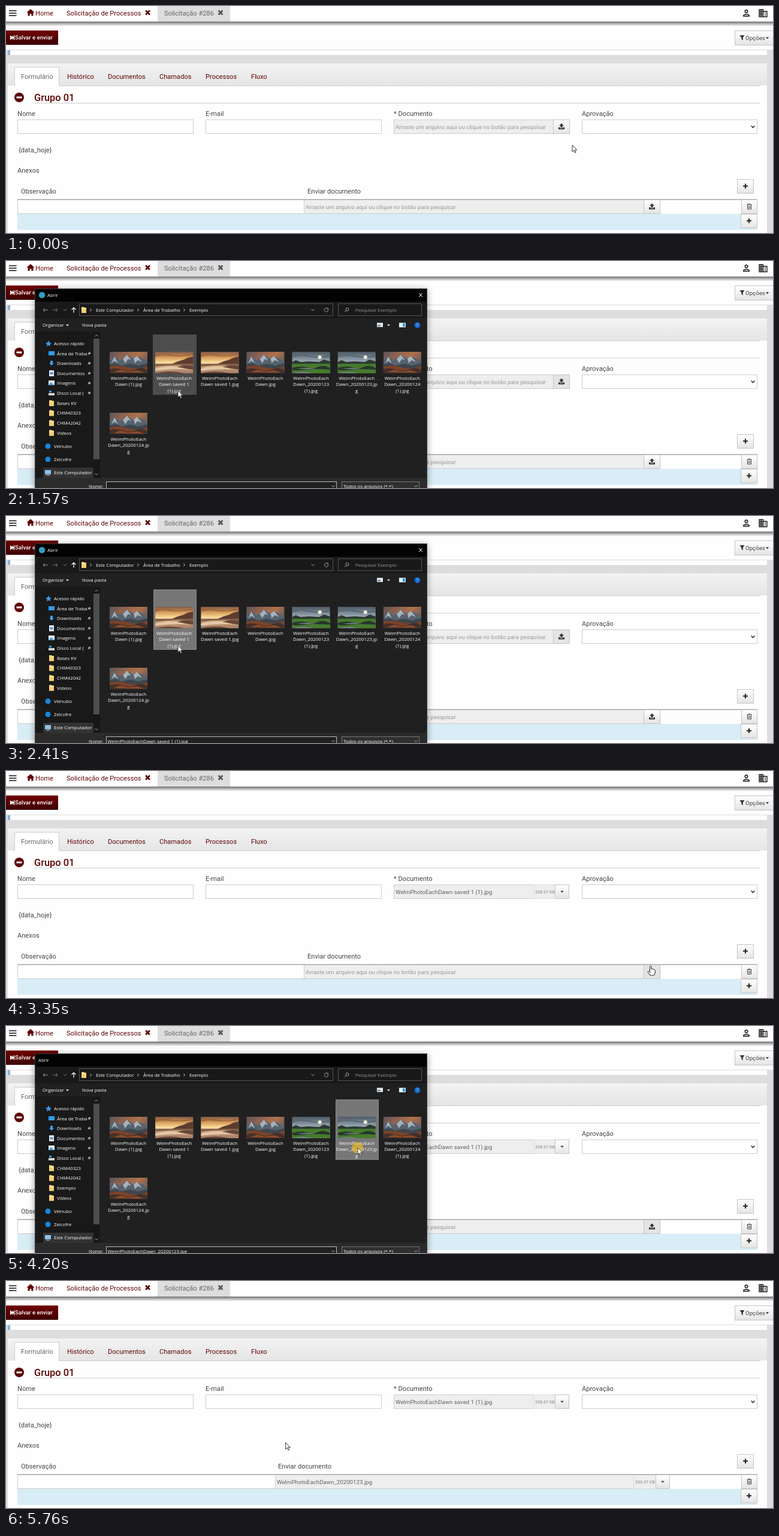
An HTML page for the animation above (6220 ms loop, 1280 by 380 pixels).

```html
<!DOCTYPE html>
<html lang="pt">
<head>
<meta charset="utf-8">
<title>Anexar documento</title>
<style>
html, body { margin: 0; width: 100%; height: 100%; overflow: hidden; background: #fefefe; }
svg { display: block; }
text { font: 11.1px Roboto, sans-serif; white-space: pre; }
.small { font-size: 9.7px; }
.tiny { font-size: 7.2px; }
.title { font-size: 16.4px; font-weight: 500; }
.bold { font-size: 9.6px; font-weight: 500; }
.dlg { font: 500 7.8px "Open Sans", sans-serif; }
.mid { text-anchor: middle; }
.glow { filter: drop-shadow(0 0 3px rgba(102, 175, 233, .8)); }
.shadow { filter: drop-shadow(0 2px 6px rgba(0, 0, 0, .4)); }
</style>
</head>
<body>
<svg id="stage" width="1280" height="380" viewBox="0 0 1280 380"></svg>
<script>
const LOOP = 6220;
const WINE = '#5f0505', INK = '#444', PALE = '#eee', EDGE = '#ccc', LIGHT = '#fff';
const PHOTO = 'WelmPhotoEachDawn';
const FIRST_FILE = PHOTO + ' saved 1 (1).jpg', SECOND_FILE = PHOTO + '_20200123.jpg';

// Drawing helpers, each returning SVG markup
const rect = (x, y, w, h, fill, extra = '') =>
  `<rect x="${x}" y="${y}" width="${w}" height="${h}" fill="${fill}" ${extra}/>`;
const box = (x, y, w, h, fill = '#fff', edge = EDGE, extra = '') =>
  rect(x + .5, y + .5, w - 1, h - 1, fill, `stroke="${edge}" ${extra}`);
const text = (x, y, s, fill = INK, cls = '') =>
  `<text x="${x}" y="${y}" fill="${fill}" class="${cls}">${s}</text>`;
const shape = (x, y, d, color) => `<path transform="translate(${x} ${y})" d="${d}" fill="${color}"/>`;
const line = (x, y, d, color, width = 1) =>
  `<path transform="translate(${x} ${y})" d="${d}" fill="none" stroke="${color}" stroke-width="${width}"/>`;
const dot = (x, y, r, color, extra = '') => `<circle cx="${x}" cy="${y}" r="${r}" fill="${color}" ${extra}/>`;
const gradient = (id, direction, ...colors) =>
  `<linearGradient id="${id}" ${direction}>${colors.map((c, i) =>
    `<stop offset="${i / (colors.length - 1)}" stop-color="${c}"/>`).join('')}</linearGradient>`;
const during = (from, to, ...parts) => `<g data-from="${from}" data-to="${to}">${parts.join('')}</g>`;

const cross = (x, y, color) => line(x, y, 'M-3.4-3.4L3.4 3.4M3.4-3.4L-3.4 3.4', color, 2.8);
const caret = (x, y, color = '#333', r = 2.7) => shape(x, y, `M${-r}-1.3H${r}L0 1.7Z`, color);
const chevron = (x, y, color, d = 'M-2.5-1.3L0 1.2L2.5-1.3') => line(x, y, d, color);
const next = (x, y) => chevron(x, y, '#ccc', 'M-1.2-2.3L1.1 0L-1.2 2.3');
const button = (x, y, w, h, face = 'url(#face)') => box(x, y, w, h, face, '#c4c4c4');
const plusButton = (x, y, w) =>
  button(x, y, w, 24) + line(x + w / 2, y + 11.5, 'M-4 0H4M0-4V4', '#222', 2);
const uploadButton = (x, y, face) => button(x, y, 28, 24, face)
  + shape(x + 14, y + 11.5, 'M0-5L4-1H1.5V2H-1.5V-1H-4ZM-5 1.5H-2.5V3H2.5V1.5H5V5H-5Z', '#333');
const folder = (x, y) => shape(x, y, 'M-4-5H0L1-4H4V5H-4Z', '#f5cf6d') + rect(x - 4, y - 2.5, 8, 1, '#fff0b8');

const arrow = (x, y, edge = '#222') =>
  `<path transform="translate(${x} ${y})" d="M0 0V11L2.6 8.6L4.4 12.6L6.2 11.9L4.4 8H7.8Z" fill="#fff" stroke="${edge}" stroke-width=".9"/>`;
const hand = (x, y) =>
  `<path transform="translate(${x} ${y})" d="M-2.5 4V-7Q-1.3-9 0-7V-2.5Q1.5-3.7 2.3-2Q3.6-3 4.3-1.5Q6-2 6.3 0V4L4.5 8H-2.5L-6 2.5Q-5.5 0-2.5 2" fill="#fff" stroke="#222"/>`;

const DOWN = 'x2="0" y2="1"';
const defs = `<defs>
  ${gradient('drop', DOWN, 'rgba(0,0,0,.55)', 'rgba(0,0,0,0)')}
  ${gradient('face', DOWN, '#fff', '#e4e4e4')}
  ${gradient('tabs', DOWN, '#f3f3f3', '#e5e5e5')}
  ${gradient('wine', DOWN, '#720000', '#3b0000')}
  ${gradient('dusk', 'x2="1" y2=".5"', '#5c5357', '#8f6350', '#b0714a', '#665a5e')}
  ${gradient('sunset', DOWN, '#7f5a48', '#d59a58', '#fbdc9c', '#c99a72', '#a07c68')}
  ${gradient('cloud', DOWN, '#4d5963', '#8593a0', '#c3cdd2', '#7d8a90')}
  <g id="peak">${rect(0, 0, 63, 36, 'url(#dusk)')}
    ${shape(0, 0, 'M0 13L8 8L17 14L29 5L38 11L46 7L63 16V28H0Z', '#56636f')}
    ${shape(0, 0, 'M29 5L36 14L31 12L26 19L22 12ZM46 7L54 17L47 14L42 19L40 11ZM8 8L14 19L8 15L3 19Z', '#a9b2ba')}
    ${shape(0, 0, 'M0 21L10 19L20 23L34 20L48 23L63 19V28H0Z', '#3e454c')}
    ${shape(0, 0, 'M0 25Q14 21 30 26T63 24V36H0Z', '#7d4329')}
    ${shape(0, 0, 'M0 29Q10 26 22 30T44 29T63 31V36H0Z', '#44302a')}
    ${shape(0, 0, 'M6 34L18 30L30 33L46 31L58 35Z', '#8d4d2c')}</g>
  <g id="beach">${rect(0, 0, 63, 36, 'url(#sunset)')}
    ${shape(0, 0, 'M0 3Q18 2 30 5T63 2V6Q40 9 24 7T0 9Z', '#a4683f')}
    ${shape(0, 0, 'M63 8Q54 9 48 13L38 16L28 20H63Z', '#5d3c30')}
    ${shape(0, 0, 'M0 20H63V24Q34 21 0 25Z', '#86614f')}
    ${shape(0, 0, 'M0 28Q24 22 44 27T63 27V30Q30 27 0 32Z', '#e2c7a9')}
    ${shape(0, 0, 'M36 25Q52 21 63 24V30Q50 28 36 25ZM0 36Q24 30 48 36Z', '#654638')}</g>
  <g id="field">${rect(0, 0, 63, 36, 'url(#cloud)')}
    ${shape(0, 0, 'M0 5Q15 1 30 6T63 4V9Q40 11 25 8T0 10Z', '#5b6973')}
    ${dot(46, 9, 3, '#fffbe0')}
    ${shape(0, 0, 'M0 17L6 14L14 17L28 16L45 17L53 13L63 16V23H0Z', '#2c3932')}
    ${rect(0, 20, 63, 16, '#477a2d')}
    ${shape(0, 0, 'M0 27Q12 23 24 26T44 25T63 27V30Q40 28 22 30T0 30Z', '#27362a')}
    ${shape(0, 0, 'M8 28Q24 26 40 28Q24 30 8 28ZM0 36Q18 31 34 36Z', '#718086')}</g>
</defs>`;

function topBar() {
  return rect(0, 26, 1280, 8, 'url(#drop)') + rect(0, 0, 1280, 26, '#fff') + rect(253, 0, 121, 26, '#ddd')
    + line(5, 0, 'M0 8H12.5M0 12H12.5M0 16H12.5', '#111', 1.7)
    + shape(41, 11, 'M0-6L6.5 0H4.5V5.5H1.3V2H-1.3V5.5H-4.5V0H-6.5Z', WINE)
    + text(49, 15.5, 'Home', WINE)
    + text(101, 15.5, 'Solicitação de Processos', WINE) + cross(236.5, 11, WINE)
    + text(264, 15.5, 'Solicitação #286', '#666') + cross(358, 11, '#555')
    + dot(1235.5, 9, 2.3, 'none', 'stroke="#111" stroke-width="1.4"')
    + line(1235.5, 17, 'M-4.7 0V-1.5Q0-5 4.7-1.5V0Z', '#111', 1.4)
    + line(1257, 6, 'M0 0H6.5V12H0ZM6.5 3H13V12H6.5M0 3H6.5M0 6H6.5M0 9H6.5M3.2 0V12M9 6H11M9 9H11', '#111', 1.3);
}

function actions() {
  return rect(0, 41, 87, 24, 'url(#wine)')
    + shape(7, 49, 'M0 0L3.5 3V0L6 3.5V0H7.2V8H6V4.5L3.5 8V5L0 8Z', '#fff')
    + text(15, 56, 'Salvar e enviar', '#fff', 'bold')
    + button(1216, 41, 66, 25) + shape(1228.5, 53, 'M-4-4H4L1.2 0V4.5L-1.2 2.5V0Z', '#333')
    + text(1234, 56.5, 'Opções', INK, 'small') + caret(1270.5, 53.5)
    + rect(0, 73, 1270, 1, '#ddd') + rect(3, 74, 4, 8, '#86b3de')
    + rect(0, 82, 1280, 14, '#ddd') + rect(0, 74, 3, 306, '#ddd') + rect(1270, 73, 10, 307, '#ddd');
}

function tabs() {
  const names = [[102, 'Histórico'], [170, 'Documentos'], [256, 'Chamados'], [333, 'Processos'], [409, 'Fluxo']];
  return rect(3, 96, 1267, 37, 'url(#tabs)') + rect(14, 133, 1245, 1, EDGE)
    + box(14, 102, 75, 32) + rect(15, 132, 73, 2, '#fff') + text(25, 121.5, 'Formulário', '#666')
    + names.map(([x, name]) => text(x, 121.5, name, WINE)).join('');
}

const HINT = 'Arraste um arquivo aqui ou clique no botão para pesquisar';
const emptyFile = (x, y, w) =>
  box(x, y, w, 24, PALE) + text(x + 3, y + 15.5, HINT, '#999', 'small') + uploadButton(x + w - 1, y);
const sentFile = (x, y, w, sizeW, buttonW, name, size) =>
  box(x, y, w, 24, PALE) + text(x + 3, y + 15.5, name, '#5c655c', 'small')
  + box(x + w - 1, y, sizeW + 1, 24, PALE, '#ddd') + text(x + w + 2, y + 14.5, size, '#888', 'tiny')
  + button(x + w + sizeW - 1, y, buttonW, 24) + caret(x + w + sizeW - 1 + buttonW / 2, y + 12);
const glow = (x, y, w) => box(x, y, w, 24, 'none', '#66afe9', 'class="glow"');

function form() {
  const labels = [[19, 'Nome'], [333, 'E-mail'], [647, '* Documento'], [961, 'Aprovação']];
  return dot(22, 153, 8, WINE) + rect(17.5, 151.5, 9, 3, '#fff')
    + rect(47, 162, 1212, 1, EDGE) + text(47, 159, 'Grupo 01', WINE, 'title')
    + labels.map(([x, s]) => text(x, 184, s)).join('')
    + box(19, 190, 294, 24) + box(333, 190, 294, 24) + box(961, 190, 293, 24)
    + line(1246.5, 202, 'M-2.8-1.5L0 1.5L2.8-1.5', '#333', 1.7)
    + during(0, 2870, emptyFile(647, 190, 267))
    + during(560, 2870, uploadButton(913, 190, '#e4e4e4'))
    + during(2870, LOOP, sentFile(647, 190, 234, 36, 24, FIRST_FILE, '338.67 KB'))
    + during(2870, 3350, glow(647, 190, 234))
    + text(21, 245, '{data_hoje}') + text(19, 279, 'Anexos') + text(25, 313.5, 'Observação')
    + plusButton(1220, 290, 28)
    + rect(19, 348, 1235, 27, '#d9edf7')
    + during(0, 4980, text(503, 313.5, 'Enviar documento'), box(19, 324, 479, 24), emptyFile(497, 324, 568))
    + during(3350, 4980, uploadButton(1064, 324, '#e4e4e4'))
    + during(4980, LOOP, text(454, 313.5, 'Enviar documento'), box(19, 324, 431, 24),
      sentFile(449, 324, 599, 37, 24, SECOND_FILE, '336.37 KB'))
    + during(4980, 5760, glow(449, 324, 599))
    + rect(19, 323, 1235, 2, '#bbb')
    + button(1227, 324, 27, 24)
    + line(1240.5, 335.5, 'M-4-3H4M-1.5-4.5H1.5M-3-3V4.5H3V-3M-1-1V3M1-1V3', '#444')
    + plusButton(1226, 348, 28);
}

function sidebar(folders) {
  const row = (x, y, s) => text(x, y + 2.8, s, LIGHT, 'dlg');
  const pin = y => shape(139, y, 'M0-3L3 0L1.5 .5L0 2.5L-1 1L-3 3L-1.5 .5L-2.5-.5L-.5-1.5Z', '#a5a9ad');
  const pinned = ['Área de Traba', 'Downloads', 'Documentos', 'Imagens', 'Disco Local ('];
  const icons = [
    rect(71, 151, 10, 7, '#2d9cf0'),
    shape(76, 171, 'M-2-4H2V0H4L0 4L-4 0H-2Z', '#3ca0f0'),
    rect(72, 183, 8, 10, '#e8eef4') + rect(73.5, 186, 5, 4, '#5b9bd5'),
    rect(71, 200, 10, 8, '#dceefa') + shape(71, 208, 'M0 0L4-5L10 0Z', '#4a9bd0'),
    rect(71, 221, 10, 4, '#d0d4d8') + rect(72, 217, 4, 3, '#2aa5ee')];
  return rect(49, 118, 108, 245, '#191919') + rect(62, 346, 84, 17, '#333')
    + shape(71, 138, 'M0-5L1.5-1.5L5-1L2.3 1.4L3 5L0 3L-3 5L-2.3 1.4L-5-1L-1.5-1.5Z', '#3b9cec')
    + row(80, 138, 'Acesso rápido')
    + pinned.map((s, i) => icons[i] + row(85, 154.7 + i * 16.6, s) + pin(154.7 + i * 16.6)).join('')
    + folders.map((s, i) => folder(76, 238 + i * 16.6) + row(85, 238 + i * 16.6, s)).join('')
    + dot(70, 310, 4.5, '#1686e0') + row(80, 310, 'Velnubo')
    + dot(70, 332, 4.5, '#1686e0') + row(80, 332, 'Zelcofre')
    + rect(65, 350, 10, 7, '#8cc4ea') + rect(67, 358, 6, 1, '#ccc') + row(80, 354, 'Este Computador')
    + rect(146, 118, 11, 245, '#171717') + rect(146, 130, 10, 202, '#4d4d4d')
    + chevron(151, 125, '#aaa', 'M-2.5 1.3L0-1.2L2.5 1.3') + chevron(151, 357, '#aaa');
}

function files() {
  const day = 'Dawn_2020012';
  const items = [
    ['peak', 'Dawn (1).jpg'], ['beach', 'Dawn saved 1', '(1).jpg'], ['beach', 'Dawn saved 1.jpg'],
    ['peak', 'Dawn.jpg'], ['field', day + '3', '(1).jpg'], ['field', day + '3.jp', 'g'],
    ['peak', day + '4', '(1).jpg'], ['peak', day + '4.jp', 'g']];
  return items.map(([kind, ...rest], i) => {
    const x = 204.5 + i % 7 * 76.15, y = i < 7 ? 152 : 254;
    return `<use href="#${kind}" x="${x - 31.5}" y="${y}"/>`
      + ['WelmPhotoEach', ...rest].map((s, n) => text(x, y + 47 + n * 10.3, s, LIGHT, 'dlg mid')).join('');
  }).join('');
}

function dialog({ title, folders, highlight, fileName }) {
  const label = (x, y, s, color = LIGHT) => text(x, y, s, color, 'dlg');
  const path = [[150, 'Este Computador'], [229, 'Área de Trabalho'], [306, 'Exemplo']];
  return box(48, 46, 655, 340, '#202020', '#3a3a3a', 'class="shadow"')
    + rect(49, 47, 653, 21, '#030303') + rect(49, 68, 653, 28, '#191919') + title(label)
    + line(62, 82, 'M8 0H0M3-3L0 0L3 3', '#999') + line(82, 82, 'M-4 0H4M1-3L4 0L1 3', '#777')
    + chevron(98.5, 82, '#888') + line(113, 82, 'M0 4.5V-4M-3.5-.5L0-4L3.5-.5', '#fff', 1.2)
    + box(122, 71, 424, 21, '#191919', '#535353') + folder(130, 82)
    + path.map(([x, s]) => next(x - 8.5, 82) + label(x, 84.8, s)).join('')
    + chevron(512, 82, '#aaa') + line(534.5, 82, 'M2.5-2A3.2 3.2 0 1 1-.5-3.2M-.5-3.2H2.7V0', '#999')
    + box(554, 71, 140, 21, '#191919', '#535353')
    + dot(569.5, 81, 2.5, 'none', 'stroke="#aaa"') + line(567.5, 83, 'M0 0L-2.5 2.5', '#aaa')
    + label(583, 84.8, 'Pesquisar Exemplo', '#999')
    + label(61, 110, 'Organizar') + caret(102.5, 107.5, '#ddd', 2.5) + label(127, 110, 'Nova pasta')
    + rect(619, 103.5, 10, 7, '#e8e8e8') + rect(620, 107, 5, 2, '#4b86b8') + caret(638.5, 107.5, '#ddd', 2.5)
    + rect(656, 103.5, 11, 7.5, '#e8f2f8') + rect(662, 104.5, 4, 5.5, '#2f9be0')
    + dot(686.5, 107.5, 5, '#1166c8') + text(686.5, 110.4, '?', '#fff', 'dlg mid')
    + sidebar(folders) + highlight + files()
    + rect(49, 363, 653, 20, '#2b2b2b') + label(138, 380, 'Nome:')
    + box(167, 369, 385, 20, '#202020', '#bbb') + chevron(546, 377, '#bbb')
    + box(560, 369, 130, 20, '#2f2f2f', '#777') + label(563, 380, 'Todos os arquivos (*.*)') + chevron(684, 377, '#bbb')
    + fileName(label);
}

const selection = x => box(x, 123, 72, 101, '#777', '#8a8a8a');
const firstDialog = dialog({
  title: label => dot(60, 57, 5.2, '#2f9fc0') + label(69, 60, 'Abrir') + line(692, 57, 'M-3-3L3 3M3-3L-3 3', '#fff'),
  folders: ['Bases KV', 'CHM40323', 'CHM42042', 'Vídeos'],
  highlight: during(1570, 2410, rect(245, 123, 73, 101, '#4d4d4d')) + during(2410, 2870, selection(246)),
  fileName: label => during(2410, 2870, label(169.5, 380, FIRST_FILE)),
});
const secondDialog = dialog({
  title: label => label(54, 60, 'Abrir'),
  folders: ['CHM40323', 'CHM42042', 'Exemplo', 'Vídeos'],
  highlight: selection(550),
  fileName: label => label(169.5, 380, SECOND_FILE),
});

const cursors = during(0, 560, arrow(945, 233)) + during(560, 1570, hand(926, 201))
  + during(1570, 2870, arrow(287, 217, '#333')) + during(2870, 3350, arrow(840, 264))
  + during(3350, 4200, hand(1077, 334))
  + during(4200, 4980, dot(586.5, 204, 9.5, '#e8bc28', 'opacity=".7"'), arrow(587, 204, '#333'))
  + during(5760, LOOP, arrow(466.5, 270.5));

const stage = document.getElementById('stage');
stage.innerHTML = defs + topBar() + actions() + tabs() + form()
  + during(1570, 2870, firstDialog) + during(4200, 4980, secondDialog) + cursors;
const timed = [...stage.querySelectorAll('[data-from]')];

function tick() {
  const t = performance.now() % LOOP;
  for (const { style, dataset } of timed)
    style.display = t >= dataset.from && t < dataset.to ? '' : 'none';
  requestAnimationFrame(tick);
}
tick();
</script>
</body>
</html>
```
